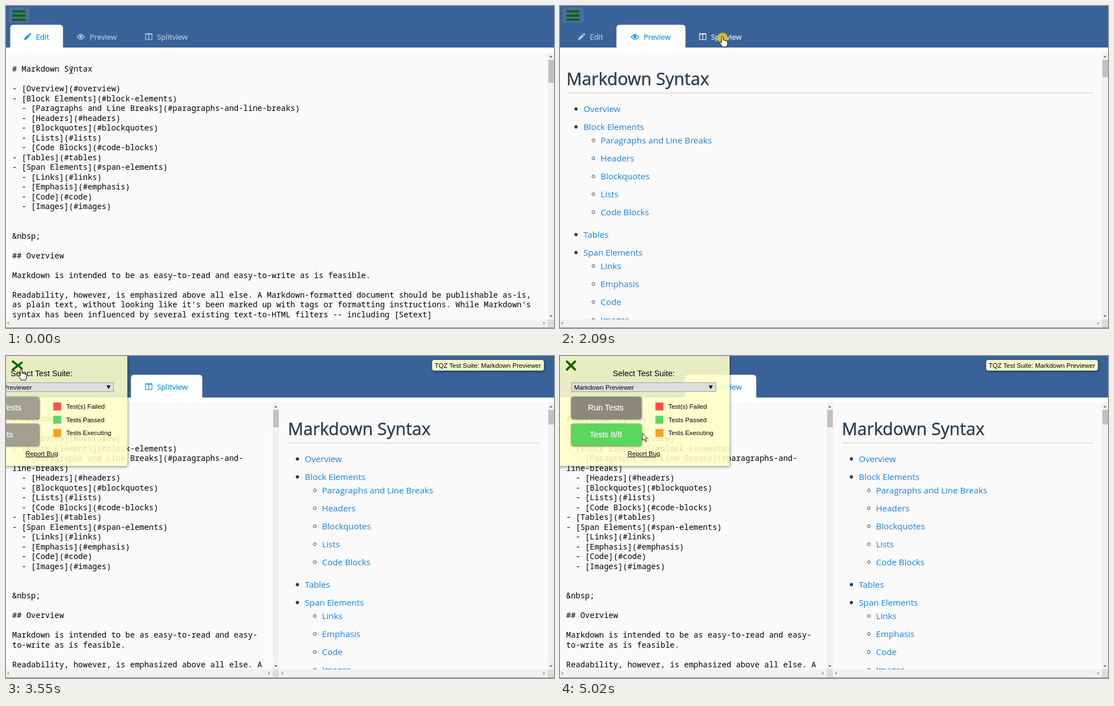
These frames come from a looping animation (976x574 px, 5100 ms). An HTML page:

```html
<!DOCTYPE html>
<html lang="en">
<head>
<meta charset="utf-8">
<title>Markdown previewer</title>
<style>
html, body { margin: 0; width: 100%; height: 100%; overflow: hidden; background: #fff; }
svg { display: block; width: 976px; height: 574px; }
text { white-space: pre; }
.mono { font: 14px "Noto Sans Mono", monospace; }
.doc { font: 15.28px "Open Sans", sans-serif; fill: #1580f5; }
.title { font: 30.56px "Open Sans", sans-serif; fill: #2c3e50; stroke: #2c3e50; stroke-width: .5; }
.tab { font: 13.37px "Open Sans", sans-serif; fill: currentColor; stroke: currentColor; stroke-width: .3; }
.small { font: 11.46px "Liberation Sans", Arial, sans-serif; }
.big { font: 14.32px "Liberation Sans", Arial, sans-serif; }
.button { filter: drop-shadow(1.5px 1.5px 1.5px rgba(0,0,0,.6)); }
.button text { fill: #fff; stroke: #fff; stroke-width: .2; text-anchor: middle; }
.box { position: absolute; border-radius: 4px; box-shadow: 1px 2px 5px rgba(0,0,0,.4); }
foreignObject { overflow: visible; }
</style>
</head>
<body>
<svg id="stage" viewBox="0 0 976 574"></svg>
<script>
const LOOP = 5100;
const stage = document.getElementById('stage');
const $ = id => document.getElementById(id);
const text = (x, y, cls, str) => `<text x="${x}" y="${y}" class="${cls}">${str}</text>`;
const rect = (x, y, w, h, fill, more = '') =>
  `<rect x="${x}" y="${y}" width="${w}" height="${h}" fill="${fill}" ${more}/>`;
const path = (d, fill, more = '') => `<path d="${d}" fill="${fill}" ${more}/>`;
// A box whose shadow does not show through its own fill
const box = (x, y, w, h, fill) => `<foreignObject x="${x}" y="${y}" width="${w}" height="${h}">
  <div class="box" style="width:${w}px;height:${h}px;background:${fill}"></div></foreignObject>`;

const source = `# Markdown Syntax

- [Overview](#overview)
- [Block Elements](#block-elements)
  - [Paragraphs and Line Breaks](#paragraphs-and-line-breaks)
  - [Headers](#headers)
  - [Blockquotes](#blockquotes)
  - [Lists](#lists)
  - [Code Blocks](#code-blocks)
- [Tables](#tables)
- [Span Elements](#span-elements)
  - [Links](#links)
  - [Emphasis](#emphasis)
  - [Code](#code)
  - [Images](#images)


&nbsp;

## Overview

Markdown is intended to be as easy-to-read and easy-to-write as is feasible.

Readability, however, is emphasized above all else. A Markdown-formatted document should be publishable as-is, as plain text, without looking like it's been marked up with tags or formatting instructions. While Markdown's syntax has been influenced by several existing text-to-HTML filters -- including [Setext]`;

// Breaks a line after spaces and hyphens, as the text area does
function wrap(line, cols) {
  const rows = [''];
  for (const piece of line.split(/(?<=[ -])/)) {
    if ((rows.at(-1) + piece).trimEnd().length > cols) rows.push('');
    rows[rows.length - 1] += piece;
  }
  return rows;
}

const editor = cols => source.split('\n').flatMap(l => wrap(l, cols)).slice(0, 27)
  .map((l, i) => text(11, 117 + i * 17.5, 'mono', l.replace(/&/g, '&amp;'))).join('');

const items = [
  [183, 0, 'Overview'], [215, 0, 'Block Elements'], [239, 1, 'Paragraphs and Line Breaks'],
  [271, 1, 'Headers'], [303, 1, 'Blockquotes'], [335, 1, 'Lists'], [367, 1, 'Code Blocks'],
  [407, 0, 'Tables'], [439, 0, 'Span Elements'], [463, 1, 'Links'], [495, 1, 'Emphasis'],
  [527, 1, 'Code'], [559, 1, 'Images']];

const preview = x => text(x + 11.5, 140.6, 'title', 'Markdown Syntax') +
  rect(x + 12, 154.5, 938 - x, 1, '#ccc') +
  items.map(([y, deep, label]) => (deep
    ? `<circle cx="${x + 59.5}" cy="${y + .5}" r="2.6" fill="none" stroke="#2c3e50"/>`
    : `<circle cx="${x + 28.5}" cy="${y + .5}" r="2.9" fill="#2c3e50"/>`) +
    text(x + (deep ? 72.3 : 41.7), y + 5.5, 'doc', label)).join('');

const scrollbars = (x0, x1, thumb) =>
  rect(x1 - 11, 83, 11, 476, '#f1f1f1') + rect(x0, 559, x1 - x0, 14, '#f1f1f1') +
  rect(x1 - 11, 559, 11, 14, '#dcdcdc') + rect(x1 - 10, 96, 10, thumb, '#c1c1c1') +
  path(`M${x1 - 8} 91.5h5l-2.5-3zM${x1 - 8} 551.5h5l-2.5 3z`, '#505050') +
  path(`M${x0 + 5} 563v5l-3-2.5zM${x1 - 19} 563v5l3-2.5z`, '#909090');

const clip = body => `<g clip-path="url(#content)">${body}</g>`;
const views = [
  clip(editor(111)) + scrollbars(0, 976, 41),
  clip(preview(0)) + scrollbars(0, 976, 31),
  clip(editor(53) + preview(490.5)) + scrollbars(0, 486, 31) + scrollbars(488, 976, 26)];

const tabs = [
  [8, 93, 53, 'Edit',
    path('M32 61l1-4 6.5-6.5 3 3-6.5 6.5zM40.3 49.7l1.2-1.2q1-.8 2 .2l.8.8q1 1 .2 2l-1.2 1.2z', 'currentColor')],
  [101, 122, 149, 'Preview',
    path('M127 55q6.3-9 12.6 0q-6.3 9-12.6 0z', 'none', 'stroke="currentColor" stroke-width="1.5"') +
    '<circle cx="133.3" cy="54.6" r="2.8" fill="currentColor"/>'],
  [223, 126, 269, 'Splitview',
    path('M248.5 50.3h11.5v9.5h-11.5zM254.2 50v10M248 49.5h12.5', 'none', 'stroke="currentColor" stroke-width="1.3"')]];

const button = (id, y) => `<g class="button">
  ${rect(19.5, y - .5, 125, 39.5, '#a19f90', `id="${id}" rx="4"`)}
  <text id="${id}Text" x="81.5" y="${y + 24}" class="big"></text></g>`;

const legend = [['#ff5145', 'Test(s) Failed'], ['#5cd65c', 'Tests Passed'], ['#ff9f1a', 'Tests Executing']]
  .map(([fill, label], i) => rect(170, 83 + i * 23.6, 14, 14, fill) + text(193, 94 + i * 23.6, 'small', label)).join('');

const bar = id => rect(-12, -1.9, 24, 3.8, '#006400', `id="${id}" rx="1.5"`);

stage.innerHTML = `
<clipPath id="content"><rect y="83" width="976" height="476"/></clipPath>
${rect(0, 0, 976, 574, '#fff')}
${rect(0, 0, 976, 74, '#396299')}
${rect(0, 83, 976, 490, '#fafafa')}
${rect(5, 2, 37, 28, '#4a6f99', 'rx="3"')}
${tabs.map(([x, w, tx, label, icon], i) => `
  ${path(`M${x} 74v-35q0-5 5-5h${w - 10}q5 0 5 5v35z`, '#fff', `id="back${i}" stroke="#fff"`)}
  <g id="tab${i}">${icon}${text(tx, 59.5, 'tab', label)}</g>`).join('')}
${views.map((v, i) => `<g id="view${i}">${v}</g>`).join('')}
${rect(0, 573, 976, 1, '#808080')}
<g id="tag">
  ${box(759, 7, 199, 19, '#f8f7cb')}
  ${text(763.5, 20.7, 'small', 'TQZ Test Suite: Markdown Previewer')}
</g>
<g id="panel">
  ${box(-10, -10, 312, 206, 'rgba(255,255,200,.88)')}
  ${text(94, 35.5, 'big', 'Select Test Suite:')}
  ${rect(20.5, 47.5, 257, 16, '#ddd', 'stroke="#a0a0a0"')}
  ${text(25, 59.5, 'small', 'Markdown Previewer')}
  ${path('M265 52.5h7l-3.5 6.5z', '#000')}
  ${button('run', 73)}${button('tests', 121)}${legend}
  ${text(120.5, 178.3, 'small" text-decoration="underline', 'Report Bug')}
</g>
${bar('top')}${bar('mid')}${bar('low')}
<circle id="ring" r="9.5" fill="#e0cc00" fill-opacity=".8"/>
<g id="cursor" stroke="#000">
  ${path('M-3-6h2.5M.5-6h2.5M0-5.5v11M-3 6h2.5M.5 6h2.5', 'none', 'id="beam" stroke="#333"')}
  ${path('M-1.5 10V1.5a1.5 1.5 0 0 1 3 0V7q3-1 3.2.8q2.6-.6 2.8 1q2.2-.3 2.2 1.6V13q0 2.5-1.5 4.5V19H0q-1.5-3-5-7.5q.5-2 3.5 0z', '#fff', 'id="hand"')}
  ${path('M0 0V12.5l3-2.7 2.2 5 2-.9-2.2-4.8h3.9z', '#fff', 'id="arrow" stroke-width=".9"')}
</g>`;

// Pointer path: time, x, y, shape from then on
const track = [
  [0, 117, 114, 'beam'], [70, 119, 112, 'beam'], [301, 147, 80, 'beam'], [378, 154, 68, 'hand'],
  [609, 161, 52, 'hand'], [1237, 161, 52, 'hand'], [1391, 195, 78, 'arrow'], [1622, 284, 90, 'arrow'],
  [1699, 288, 66, 'hand'], [1776, 289, 54, 'hand'], [2244, 289, 54, 'hand'], [2475, 281, 78, 'arrow'],
  [2552, 275, 85, 'arrow'], [2650, 218, 91, 'beam'], [2784, 127, 92, 'beam'], [2938, 62, 68, 'arrow'],
  [3092, 30, 33, 'hand'], [3170, 27, 24, 'hand'], [3632, 27, 24, 'hand'], [3710, 34, 34, 'arrow'],
  [3864, 54, 58, 'arrow'], [4095, 71, 80, 'hand'], [4249, 76, 88, 'hand'], [4560, 76, 88, 'hand'],
  [4791, 112, 113, 'hand'], [4868, 128, 125, 'hand'], [4945, 140, 132, 'arrow'], [5022, 147, 138, 'arrow'], [LOOP, 147, 138, 'arrow']];
const clicks = [[1010, 1160], [2090, 2165], [3245, 3390], [4400, 4555]];

const ramp = (t, a, b) => Math.min(1, Math.max(0, (t - a) / (b - a)));
const show = (id, on) => $(id).style.display = on ? '' : 'none';
const place = (id, x, y, turn = 0) => $(id).setAttribute('transform', `translate(${x} ${y}) rotate(${turn})`);

const bursts = [0, 70, 1010, 1160, 2090, 2630, 3170, 3710, 4560];
function snap(t) {
  const start = bursts.filter(b => b <= t).at(-1);
  return start + Math.floor((t - start + 5) / 77) * 77;
}

function draw(now) {
  const t = snap(now % LOOP);

  const k = Math.max(0, track.findLastIndex(p => p[0] <= t));
  const [t0, x0, y0, shape] = track[k], [t1, x1, y1] = track[k + 1] || track[k];
  const f = ramp(t, t0, t1 || 1), x = x0 + (x1 - x0) * f, y = y0 + (y1 - y0) * f;
  place('cursor', x, y);
  for (const s of ['beam', 'hand', 'arrow']) show(s, s === shape);
  show('ring', clicks.some(([a, b]) => t >= a && t < b));
  place('ring', x + .5, y + (t < 2000 ? -1.5 : 3));

  const view = t < 1160 ? 0 : t < 2165 ? 1 : 2;
  tabs.forEach(([left, w], i) => {
    const hover = y > 34 && y < 74 && x > left && x < left + w;
    show('view' + i, i === view);
    show('back' + i, i === view);
    $('tab' + i).style.color = i === view ? '#1c96f0' : hover ? '#e4ebf3' : '#b4c3d8';
  });

  const left = 1 - ramp(t, 3400, 3732), open = 1 - left ** 2, cross = 1 - left ** 3;
  show('panel', open > 0);
  place('panel', -302 * (1 - open), 0);
  show('tag', open > 0);
  const cx = 23 - 3.5 * cross, gap = 7.4 * (1 - cross);
  place('top', cx, 17 - gap, 45 * cross);
  place('mid', cx, 17);
  place('low', cx, 17 + gap, -45 * cross);
  $('mid').style.opacity = Math.max(0, 1 - 2 * cross);

  const light = 1 - ramp(t, 4090, 4240) + ramp(t, 4600, 5090);
  $('run').setAttribute('fill', `rgb(${[161, 159, 144].map(c => Math.round(c * Math.min(1, light)))})`);
  $('runText').textContent = 'Run Tests';
  const passed = Math.floor(8 * ramp(t, 4630, 4868));
  $('tests').setAttribute('fill', t < 4630 ? '#a19f90' : passed < 8 ? '#ff9f1a' : '#5cd65c');
  $('testsText').textContent = t < 4630 ? 'Tests' : `Tests ${passed}/8`;
}

const began = performance.now();
function tick() {
  draw(performance.now() - began);
  requestAnimationFrame(tick);
}
tick();
</script>
</body>
</html>
```
